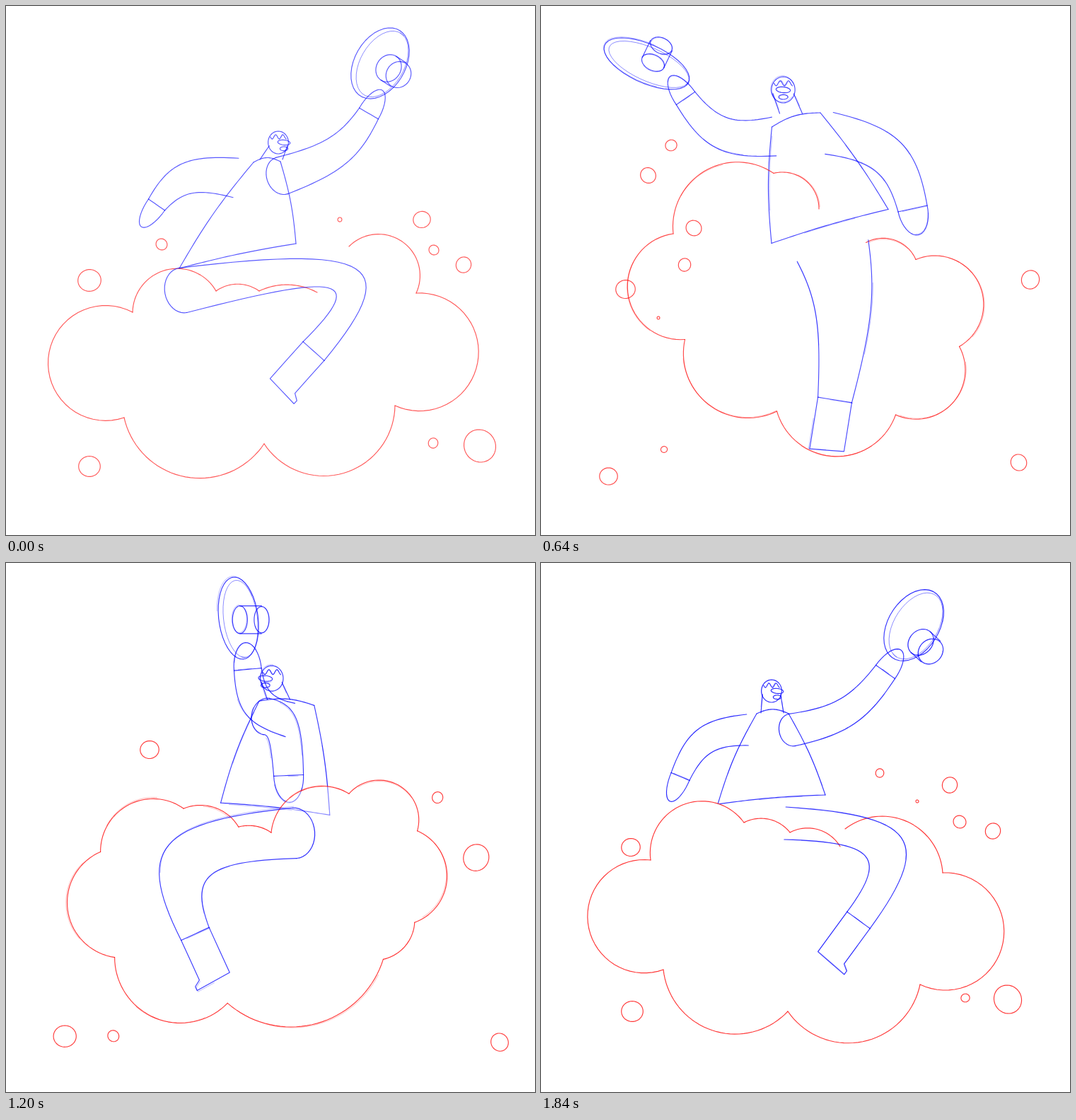
These frames come from a looping animation (748 by 748 pixels, 1.92 s). An HTML page with a canvas:

```html
<!DOCTYPE html>
<html lang="en">
<head>
<meta charset="utf-8">
<title>Cloud rider</title>
<style>
html, body { margin: 0; width: 100%; height: 100%; overflow: hidden; background: #fff; }
canvas { display: block; width: 100vw; height: 100vh; }
</style>
</head>
<body>
<canvas id="stage" width="748" height="748"></canvas>
<script>
const ctx = document.getElementById('stage').getContext('2d');
const STEP = 80, FRAMES = 24;
const BLUE = '0,0,255', RED = '255,0,0';

// hat: centre, radii, degrees    crown: base, end, radius    head: centre, radius, facing, neck
// limbs: root, bend, wrist or ankle, root width, end width, rounded root, toe side
// torso: top left, top right, base left, base right
// cloud: clockwise corners, each with the bulge of the lobe that follows
const POSES = [
  { at: 0, rough: .2, ink: .65, front: 0,
    hat: [529, 81, 54, 36, -60], crown: [541, 88, 555, 97, 20],
    arm: [390, 240, 479, 211, 513, 152, 54, 31, 1], rest: [325, 243, 247, 232, 213, 281, 56, 28, 0],
    leg: [250, 402, 563, 345, 435, 488, 64, 40, 1, 1],
    head: [385, 193, 16, 1, 375, 217], torso: [350, 221, 388, 220, 245, 371, 410, 336],
    cloud: [[167, 582, .76], [179, 433, .38], [297, 403, .16], [358, 403, .12], [440, 405, 0],
      [485, 340, .42], [580, 406, .64], [550, 565, .37], [365, 619, .33], [167, 582, 0]],
    bubbles: [[118, 651, 15], [670, 622, 23], [647, 366, 11], [118, 388, 16], [220, 337, 8],
      [604, 618, 7], [588, 302, 12], [605, 345, 7], [472, 302, 3]] },
  { at: 3, rough: 1, ink: .75, front: .6,
    hat: [420, 75, 54, 19, -22], crown: [403, 72, 391, 47, 18],
    arm: [363, 236, 296, 183, 340, 115, 40, 42, 1], rest: [434, 240, 500, 240, 512, 298, 20, 40, 0],
    leg: [262, 393, 498, 364, 386, 486, 78, 34, 1, 1],
    head: [438, 196, 18, 0, 424, 245], torso: [385, 212, 434, 230, 256, 343, 413, 342],
    cloud: [[232, 655, .53], [130, 529, .44], [245, 430, 0], [382, 347, .27], [425, 254, .16],
      [515, 283, .35], [632, 355, .4], [583, 442, .38], [432, 571, .28], [232, 655, 0]],
    bubbles: [[98, 671, 16], [680, 635, 20], [676, 366, 7], [106, 377, 16], [211, 331, 4],
      [615, 640, 15], [590, 248, 8]] },
  { at: 6, rough: .8, ink: .72, front: 0,
    hat: [96, 88, 66, 27, 28], crown: [105, 85, 116, 65, 18],
    arm: [309, 168, 222, 184, 149, 140, 60, 34, 1], rest: [400, 165, 495, 196, 506, 277, 70, 44, 0],
    leg: [370, 352, 421, 433, 367, 584, 120, 50, 0, 1], farLeg: [470, 305, 594, 328, 623, 460, 100, 48, 0, 1],
    head: [315, 100, 18, .5, 325, 133], torso: [305, 160, 375, 130, 303, 357, 470, 248],
    cloud: [[190, 333, .55], [152, 216, .33], [322, 116, .26], [370, 205, .15], [380, 365, 0],
      [432, 367, .2], [478, 361, .47], [555, 495, .48], [428, 580, .43], [282, 485, .28]],
    bubbles: [[85, 687, 5], [688, 656, 8], [162, 552, 7], [83, 422, 15], [118, 208, 12],
      [615, 658, 5], [182, 612, 3], [144, 503, 22]] },
  { at: 10, rough: .3, ink: .7, front: 0,
    hat: [203, 75, 64, 28, 20], crown: [212, 75, 224, 47, 16],
    arm: [350, 201, 275, 204, 260, 121, 50, 30, 0], rest: [415, 195, 518, 203, 545, 296, 50, 40, 0],
    leg: [455, 340, 452, 418, 464, 530, 90, 47, 0, -1],
    head: [370, 137, 19, -.5, 382, 171], torso: [348, 182, 415, 172, 349, 314, 512, 327],
    cloud: [[217, 610, .42], [222, 428, .31], [336, 357, .23], [416, 369, 0], [487, 302, 0],
      [487, 302, .24], [582, 356, .47], [628, 468, .24], [575, 576, .3], [385, 661, .35]],
    bubbles: [[106, 643, 20], [663, 635, 15], [692, 387, 13], [156, 379, 12], [185, 271, 10],
      [203, 366, 9], [166, 642, 6], [216, 314, 11], [166, 441, 2], [184, 197, 8]] },
  { at: 13, rough: .5, ink: .74, front: 0,
    hat: [249, 88, 56, 17, 88], crown: [250, 95, 285, 95, 20],
    arm: [359, 258, 267, 246, 259, 168, 50, 38, 0], rest: [400, 247, 515, 233, 532, 312, 48, 42, 1],
    leg: [508, 412, 230, 383, 307, 520, 66, 43, 1, -1],
    head: [365, 200, 18, -1, 388, 222], torso: [360, 232, 453, 229, 356, 372, 515, 376],
    cloud: [[168, 582, .37], [118, 412, .33], [252, 324, .31], [356, 372, 0], [397, 442, .2],
      [465, 417, .42], [588, 390, .36], [651, 497, .28], [577, 584, .27], [352, 640, .28]],
    bubbles: [[88, 656, 23], [690, 668, 19], [708, 367, 17], [203, 264, 13], [153, 656, 12],
      [607, 318, 7]] },
  { at: 18, rough: 1, ink: .8, front: 1,
    hat: [448, 63, 62, 44, 75], crown: [452, 58, 476, 58, 19],
    arm: [466, 168, 467, 147, 466, 124, 48, 40, 0], rest: [320, 172, 218, 205, 201, 283, 58, 42, 1],
    leg: [258, 337, 178, 418, 208, 531, 80, 44, 0, -1],
    head: [392, 108, 18, -1, 382, 150], torso: [355, 140, 410, 160, 225, 290, 372, 327],
    cloud: [[132, 521, .39], [157, 403, .27], [250, 382, 0], [288, 375, .28], [342, 290, .39],
      [515, 190, .37], [572, 362, .31], [468, 525, 0], [468, 525, .27], [255, 596, .42]],
    bubbles: [[76, 689, 5], [710, 692, 3], [600, 491, 21], [531, 545, 15], [150, 688, 2],
      [615, 352, 9]] },
  { at: 23, rough: .3, ink: .78, front: 1,
    hat: [527, 88, 55, 36, 122], crown: [537, 112, 551, 125, 20],
    arm: [355, 236, 440, 220, 487, 154, 46, 33, 1], rest: [292, 236, 223, 240, 197, 302, 44, 28, 0],
    leg: [345, 368, 542, 378, 449, 505, 46, 40, 0, 1],
    head: [326, 181, 16, 1, 327, 212], torso: [305, 213, 350, 213, 250, 341, 402, 328],
    cloud: [[173, 575, .63], [155, 420, .39], [287, 367, .18], [352, 381, .2], [423, 401, 0],
      [430, 376, .3], [568, 438, .64], [536, 596, 0], [536, 596, .33], [349, 634, .32]],
    bubbles: [[129, 634, 15], [660, 617, 20], [639, 379, 11], [127, 402, 13], [532, 337, 2],
      [578, 314, 11], [600, 615, 6], [592, 366, 9], [479, 297, 6]] }
];

let pose, seed;
const random = () => {
  const v = Math.sin(++seed * 12.9898) * 43758.5453;
  return v - Math.floor(v);
};

// Numbers and nested lists blend; a part without a partner belongs to the nearer pose
function mix(a, b, t) {
  if (a === undefined || b === undefined) return t < .5 ? a : b;
  return typeof a === 'number' ? a + (b - a) * t : a.map((v, i) => mix(v, b[i], t));
}
const add = (p, d, k) => [p[0] + d[0] * k, p[1] + d[1] * k];
const unit = (a, b) => {
  const l = Math.hypot(b[0] - a[0], b[1] - a[1]) || 1;
  return [(b[0] - a[0]) / l, (b[1] - a[1]) / l];
};
const side = d => [d[1], -d[0]];
const trace = (n, f) => Array.from({ length: n + 1 }, (_, i) => f(i / n));

function line(pts, color, alpha, width) {
  ctx.beginPath();
  pts.forEach(p => ctx.lineTo(p[0], p[1]));
  ctx.strokeStyle = `rgba(${color},${alpha})`;
  ctx.lineWidth = width;
  ctx.stroke();
}

// One firm line, plus loose faint passes where the drawing is rough
function sketch(pts, color = BLUE) {
  line(pts, color, pose.ink, 1.15);
  const passes = Math.round(pose.rough * (color === BLUE ? 2 : 1));
  for (let i = 0; i < passes; i++) {
    const from = random() * .4 * pts.length, to = (.6 + random() * .4) * pts.length;
    const shift = [random() - .5, random() - .5];
    line(pts.slice(from, to).map(p => add(p, shift, 6 * pose.rough)), color, .3, .9);
  }
}

// Curve from a to b drawn toward the corner c
function bend(a, c, b, pull = .8) {
  const p = mix(a, c, pull), q = mix(b, c, pull);
  return trace(30, t => {
    const s = 1 - t;
    return [0, 1].map(i => s * s * s * a[i] + 3 * s * s * t * p[i] + 3 * s * t * t * q[i] + t * t * t * b[i]);
  });
}

function bulge(a, b, height) {
  return bend(a, add(mix(a, b, .5), side(unit(a, b)), height), b);
}

// Rounded end across a limb, reaching out along d
function cap(a, b, d, reach) {
  return trace(20, t => add(mix(a, b, .5 - .5 * Math.cos(Math.PI * t)), d, reach * Math.sin(Math.PI * t)));
}

function ellipse(x, y, rx, ry, angle) {
  const c = Math.cos(angle), s = Math.sin(angle);
  return trace(40, t => {
    const u = rx * Math.cos(t * 6.5), v = ry * Math.sin(t * 6.5);
    return [x + u * c - v * s, y + u * s + v * c];
  });
}

// Two edges and a cuff; returns what hands and boots need
function limb([x, y, kx, ky, ex, ey, w, endW, round]) {
  const root = [x, y], knee = [kx, ky], end = [ex, ey];
  const d0 = unit(root, knee), d = unit(knee, end), n0 = side(d0), n = side(d);
  const turn = Math.max(.5, 1 + n0[0] * n[0] + n0[1] * n[1]);
  const miter = [(n0[0] + n[0]) / turn, (n0[1] + n[1]) / turn];
  const [a, b] = [1, -1].map(s => {
    const tip = add(end, n, s * endW / 2);
    sketch(bend(add(root, n0, s * w / 2), add(knee, miter, s * (w + endW) / 4), tip));
    return tip;
  });
  sketch(trace(6, t => mix(a, b, t)));
  if (round > .5) sketch(cap(add(root, n0, w / 2), add(root, n0, -w / 2), d0, -w * .4));
  return { a, b, d, n };
}

function drawArm(data) {
  const { a, b, d } = limb(data);
  sketch(cap(a, b, d, 38));
}

function drawLeg(data) {
  const { a, b, d, n } = limb(data), toe = data[9];
  const [front, back] = toe > 0 ? [a, b] : [b, a];
  const heel = add(back, d, 70), ankle = add(front, d, 62);
  const tip = add(add(front, d, 74), n, toe * 9);
  sketch([back, mix(back, heel, .5), heel, mix(heel, tip, .5), tip, add(tip, d, -6), ankle, mix(ankle, front, .5), front]);
}

function drawHat([x, y, rx, ry, deg], [bx, by, ex, ey, r]) {
  const tilt = deg * Math.PI / 180;
  sketch(ellipse(x, y, rx, ry, tilt));
  line(ellipse(x + 3, y + 1, rx * .94, ry * .86, tilt), BLUE, .45, 1);
  const base = [bx, by], end = [ex, ey], n = side(unit(base, end));
  const len = Math.hypot(ex - bx, ey - by), flat = r * (1 - (len / 45) ** 2);
  const angle = Math.atan2(n[1], n[0]);
  sketch(ellipse(bx, by, r, flat, angle));
  sketch(ellipse(ex, ey, r * .95, flat, angle));
  for (const s of [r, -r]) sketch([add(base, n, s), add(end, n, s)]);
}

function drawHead([x, y, r, facing, nx, ny]) {
  sketch(ellipse(x, y, r * .9, r, 0));
  for (const s of [-1, 1]) sketch(trace(6, t => mix([x + s * r * .8, y + r * .3], [nx + s * 16, ny], t)));
  const fx = x + facing * r * .5;
  sketch(ellipse(fx, y, r * .55, r * .22, .1));
  sketch(ellipse(fx, y + r * .55, r * .35, r * .18, 0));
  sketch(trace(16, t => [x + r * (t * 1.4 - .7), y - r * .5 + r * .2 * Math.sin(t * 14)]));
}

function drawTorso([lx, ly, rx, ry, blx, bly, brx, bry]) {
  const left = [lx, ly], right = [rx, ry], baseL = [blx, bly], baseR = [brx, bry];
  sketch(bulge(baseL, left, 8));
  sketch(bulge(left, right, 10));
  sketch(bulge(right, baseR, 6));
  sketch(bulge(baseL, baseR, 4));
}

// Circular arc over a chord; b is its height divided by the chord
function lobe([x, y, b], next) {
  if (b < .01) return [[x, y], next.slice(0, 2)];
  const half = 2 * Math.atan(2 * b), dx = next[0] - x, dy = next[1] - y;
  return trace(36, t => {
    const f = half * (2 * t - 1);
    const along = .5 + Math.sin(f) / (2 * Math.sin(half));
    const up = (Math.cos(f) - Math.cos(half)) / (2 * Math.sin(half));
    return [x + dx * along + dy * up, y + dy * along - dx * up];
  });
}

function drawCloud(corners) {
  const lobes = corners.map((c, i) => lobe(c, corners[(i + 1) % corners.length]));
  ctx.beginPath();
  lobes.flat().forEach(p => ctx.lineTo(p[0], p[1]));
  ctx.fillStyle = `rgba(255,255,255,${pose.front})`;
  ctx.fill();
  lobes.forEach((pts, i) => { if (corners[i][2] > .08) sketch(pts, RED); });
}

// Bubbles drift to their partner, or pop when it is too far away
function drawBubbles(from, to, t) {
  for (let i = 0; i < Math.max(from.length, to.length); i++) {
    const a = from[i], b = to[i];
    const near = a && b && Math.hypot(a[0] - b[0], a[1] - b[1]) < 200;
    const c = near ? mix(a, b, t) : t < .5 ? a : b;
    if (c) line(ellipse(c[0], c[1], c[2] * 1.02, c[2] * .96, i), RED, pose.ink, 1.15);
  }
}

function draw(frame) {
  const i = POSES.findLastIndex(p => p.at <= frame);
  const from = POSES[i], to = POSES[(i + 1) % POSES.length];
  const t = (frame - from.at) / ((to.at || FRAMES) - from.at);
  pose = {};
  for (const key of new Set([...Object.keys(from), ...Object.keys(to)]))
    if (key !== 'bubbles') pose[key] = mix(from[key], to[key], t);
  seed = frame * 500;

  ctx.fillStyle = '#fff';
  ctx.fillRect(0, 0, 748, 748);
  drawTorso(pose.torso);
  drawArm(pose.rest);
  drawHead(pose.head);
  drawCloud(pose.cloud);
  if (pose.farLeg) drawLeg(pose.farLeg);
  drawLeg(pose.leg);
  drawHat(pose.hat, pose.crown);
  drawArm(pose.arm);
  drawBubbles(from.bubbles, to.bubbles, t);
}

ctx.lineCap = ctx.lineJoin = 'round';
let shown = -1;
function tick() {
  const frame = Math.floor(performance.now() / STEP) % FRAMES;
  if (frame !== shown) draw(shown = frame);
  requestAnimationFrame(tick);
}
tick();
</script>
</body>
</html>
```
